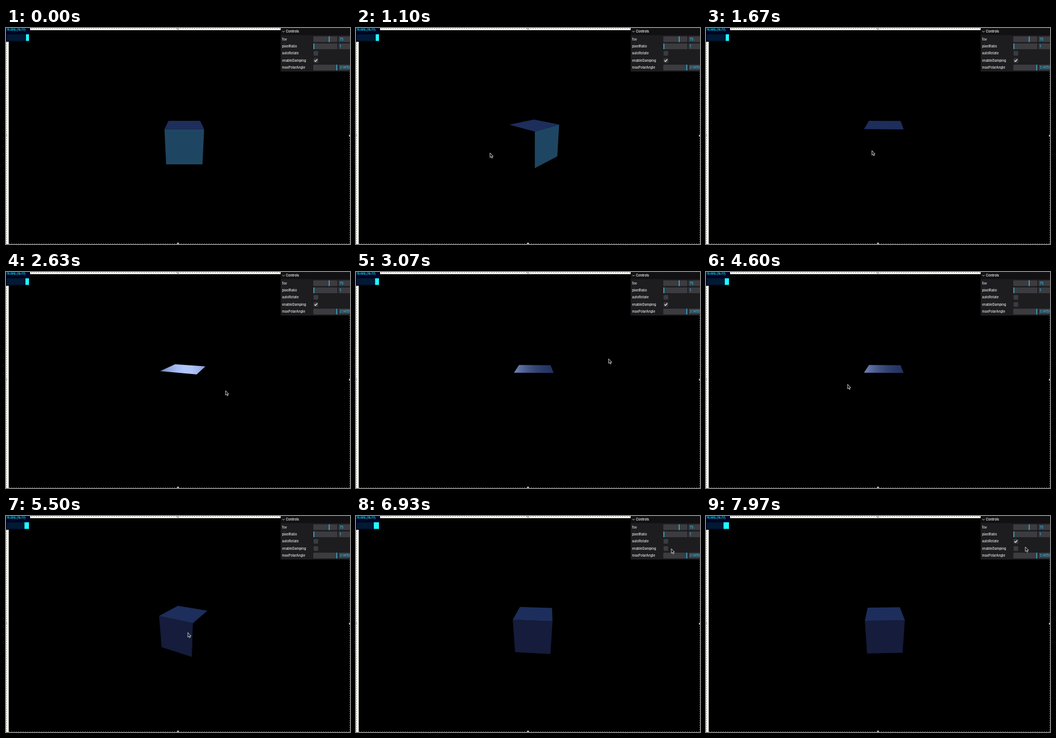
Recreate the animation shown at these times as an HTML page. Size 600 by 377 pixels, loop 8000 ms.

```html
<!DOCTYPE html>
<html lang="en">
<head>
<meta charset="utf-8">
<title>Cube viewer</title>
<style>
  html, body { margin: 0; width: 100%; height: 100%; overflow: hidden; background: #000; }
  svg { display: block; width: 100vw; height: 100vh; }
  text { font: 500 5.6px Inter, sans-serif; fill: #ebebeb; }
  .fps { font: 700 4.8px "Liberation Sans", sans-serif; fill: #0ff; }
  .value { fill: #2cc9ff; }
  .field { fill: #3c3c40; }
  .mark { fill: #2cc9ff; }
  .tick { fill: none; stroke: #fff; stroke-width: 1.1; }
  .ants { fill: none; stroke-dasharray: 2 2; opacity: .5; }
</style>
</head>
<body>
<svg viewBox="0 0 600 377" preserveAspectRatio="none">
  <defs><linearGradient id="shine" gradientUnits="userSpaceOnUse" x1="261" x2="361" y1="0" y2="0"/></defs>
  <rect width="600" height="377"/>
  <rect y="24" width="4.7" height="353" fill="#fffffa"/>
  <rect x="42" width="437" height="3.7" fill="#fffffa"/>

  <g id="cube"></g>

  <rect width="41.5" height="24" fill="#002"/>
  <rect x="1.5" y="11" width="38.5" height="11.5" fill="#001a33"/>
  <text class="fps" x="1" y="4.6">75 FPS (75-77)</text>
  <rect id="graph" y="11" height="11.5" fill="#20ffff"/>

  <g id="panel">
    <rect x="479" width="121" height="76" fill="#1d1d20"/>
    <rect x="479" width="121" height="12.5" fill="#111113"/>
    <path d="M482 5.2l2 2 2-2" fill="none" stroke="#ebebeb" stroke-width=".8"/>
    <text x="488.2" y="8.2" style="font-weight:600">Controls</text>
  </g>

  <path class="ants" d="M0 .5H600M.5 24V377" stroke="#222"/>
  <path class="ants" d="M5 376.5H600M599.5 76V377" stroke="#bbb"/>
  <g fill="#eee" stroke="#555" stroke-width=".6">
    <circle cx="300" cy="1" r="1.5"/><circle cx="300" cy="376" r="1.5"/>
    <circle cx="0" cy="188" r="1.5"/><circle cx="599.5" cy="188" r="1.5"/>
  </g>
  <path id="cursor" d="M0 0V8L1.9 6.4 3.1 9.1 4.4 8.5 3.2 5.9H5.5Z" fill="#111" stroke="#eee" stroke-width=".8"/>
</svg>
<script>
const LOOP = 8000, CX = 311, CY = 197.5, FOCAL = 257.4, DIST = 4.36;
const $ = id => document.getElementById(id);
const rad = deg => deg * Math.PI / 180;

// Progress 0..1 between two times; power 1 is linear, higher powers ease out
const ramp = (t, from, to, power = 1) =>
  1 - (1 - Math.min(1, Math.max(0, (t - from) / (to - from)))) ** power;

function add(parent, tag, attrs, text) {
  const el = document.createElementNS("http://www.w3.org/2000/svg", tag);
  for (const key in attrs) el.setAttribute(key, attrs[key]);
  if (text) el.textContent = text;
  parent.append(el);
  return el;
}

// Control rows: sliders have a mark position and a value, the others are checkboxes
const ticks = {};
[["fov", 563, "75"], ["pixelRatio", 536.3, "1"], ["autoRotate"], ["enableDamping"], ["maxPolarAngle", 576.5, "3.14159"]]
  .forEach(([name, mark, value], i) => {
    const y = 19.6 + i * 12.35, panel = $("panel");
    add(panel, "text", { x: 481.5, y: y + 2 }, name);
    if (value) {
      add(panel, "rect", { class: "field", x: 536, y: y - 5, width: 42, height: 10, rx: 1 });
      add(panel, "rect", { class: "field", x: 580, y: y - 5, width: 22, height: 10, rx: 1 });
      add(panel, "rect", { class: "mark", x: mark, y: y - 5, width: 1.3, height: 10 });
      add(panel, "text", { class: "value", x: 582, y: y + 2 }, value);
    } else {
      add(panel, "rect", { class: "field", x: 536.5, y: y - 4, width: 8, height: 8, rx: 1 });
      ticks[name] = add(panel, "path", { class: "tick", d: `M538 ${y}l1.8 1.8 3.2-3.8` });
    }
  });

const sides = ["#1e4662", "#151c3c", "#000", "#000"].map(fill => add($("cube"), "polygon", { fill }));
const lid = add($("cube"), "polygon", { fill: "url(#shine)" });
const stops = Array.from({ length: 9 }, (_, i) => add($("shine"), "stop", { offset: i / 8 }));

// Pointer legs: start, end, x, y, easing power
const legs = [
  [30, 230, 180, 222, 1], [550, 2630, 383, 207, 1], [2950, 3550, 542, 54, 2], [3900, 4600, 247, 196, 2],
  [5100, 5920, 342, 206, 2], [6630, 6930, 550, 57, 2], [7000, 7300, 540, 42, 2], [7500, 7950, 557, 54, 2]
];

function pointerAt(t) {
  return legs.reduce(([px, py], [from, to, x, y, power]) => {
    const u = ramp(t, from, to, power);
    return [px + (x - px) * u, py + (y - py) * u];
  }, [592, 296]);
}

function project(azimuth, y, tilt) {
  const x = Math.SQRT1_2 * Math.sin(azimuth), z = Math.SQRT1_2 * Math.cos(azimuth);
  const s = Math.sin(tilt), c = Math.cos(tilt);
  const scale = FOCAL / (DIST - y * s - z * c);
  return [CX + x * scale, CY - (y * c - z * s) * scale];
}

function drawCube(turn, tilt) {
  const corner = (k, y) => project(rad(turn + 90 * k - 45), y, rad(tilt));
  sides.forEach((side, k) => {
    const p = [corner(k, .5), corner(k + 1, .5), corner(k + 1, -.5), corner(k, -.5)];
    const [a, b, c] = p;
    const facing = (b[0] - a[0]) * (c[1] - a[1]) - (b[1] - a[1]) * (c[0] - a[0]) > 0;
    side.setAttribute("points", facing ? p.join(" ") : "");
  });
  lid.setAttribute("points", [0, 1, 2, 3].map(k => corner(k, .5)).join(" "));

  // The highlight slides across the lid as the cube turns
  const centre = 315 - (turn - 160) * 4.6;
  stops.forEach((stop, i) => {
    const glow = Math.exp(-(((261 + i * 12.5 - centre) / 60) ** 2));
    const mix = (from, to) => Math.round(from + (to - from) * glow);
    stop.setAttribute("stop-color", `rgb(${mix(29, 178)},${mix(46, 200)},${mix(92, 255)})`);
  });
}

function draw(now) {
  const t = now % LOOP;
  // Two drags, then automatic rotation
  const drag = ramp(t, 488, 2875);
  const turn = 178.3 * drag + 86.2 * ramp(t, 5100, 5920, 2) + 7.7 * ramp(t, 7450, LOOP);
  const tilt = 20 - 1.1 * drag ** 3 + 8.4 * ramp(t, 5100, 5920, 4);
  drawCube(turn, tilt);

  $("cursor").setAttribute("transform", `translate(${pointerAt(t)})`);
  $("cursor").style.display = t < 35 ? "none" : "";
  const left = 35 - .55 * Math.floor(t / 1000 + .3);
  $("graph").setAttribute("x", left);
  $("graph").setAttribute("width", 40 - left);
  ticks.enableDamping.style.display = t < 3680 ? "" : "none";
  ticks.autoRotate.style.display = t < 7450 ? "none" : "";
}

const start = performance.now();
function tick() {
  draw(performance.now() - start);
  requestAnimationFrame(tick);
}
tick();
</script>
</body>
</html>
```
